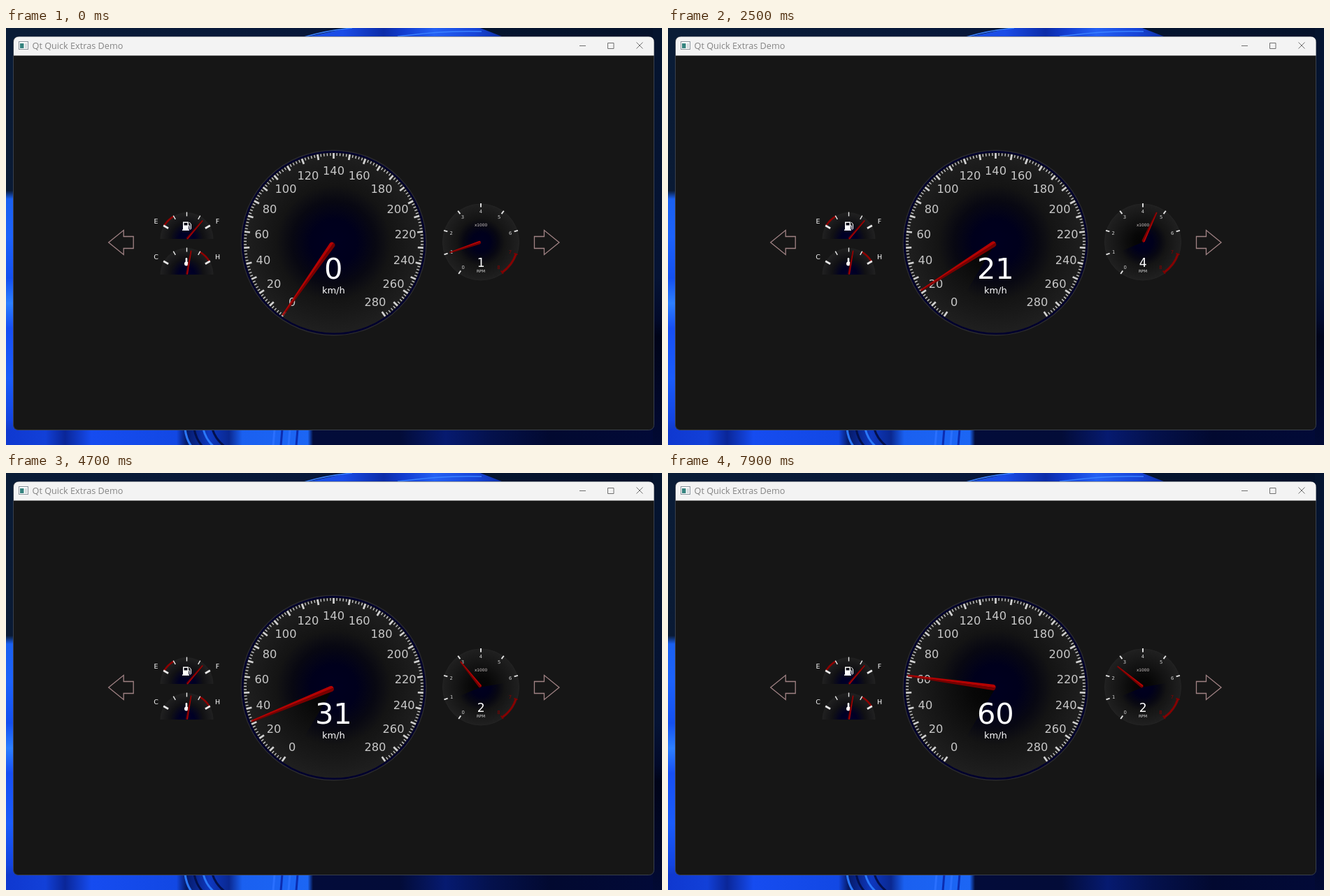
These frames come from a looping animation (938x597 px, 8 s). An HTML page:

```html
<!DOCTYPE html>
<html lang="en">
<head>
<meta charset="utf-8">
<title>Dashboard</title>
<style>
  html, body { margin: 0; width: 100%; height: 100%; overflow: hidden; background: #04102a; }
  svg { display: block; width: 938px; height: 597px; }
  text { font-family: "DejaVu Sans", sans-serif; text-anchor: middle; }
  .title { font-family: "Open Sans", sans-serif; text-anchor: start; }
</style>
</head>
<body>
<svg id="stage" viewBox="0 0 938 597"></svg>
<script>
const NS = "http://www.w3.org/2000/svg";
const stage = document.getElementById("stage");

function add(tag, attrs, parent = stage) {
  const el = document.createElementNS(NS, tag);
  for (const k in attrs) el.setAttribute(k, attrs[k]);
  parent.appendChild(el);
  return el;
}
const rect = (x, y, width, height, fill, more) => add("rect", { x, y, width, height, fill, ...more });
const circle = (cx, cy, r, fill, more) => add("circle", { cx, cy, r, fill, ...more });
const stroke = (d, color, width, more) =>
  add("path", { d, fill: "none", stroke: color, "stroke-width": width, ...more });

// Text centred vertically on its digits
function label(s, x, y, size, fill = "#fff", more) {
  const el = add("text", { x, y: y + size * 0.364, "font-size": size, fill, ...more });
  el.textContent = s;
  return el;
}

// stops: "offset color, offset color, ..."
function gradient(id, kind, attrs, stops) {
  const g = add(kind, { id, ...attrs });
  for (const s of stops.split(",")) {
    const [offset, color] = s.trim().split(" ");
    add("stop", { offset, "stop-color": color }, g);
  }
  return `url(#${id})`;
}
const across = (id, stops) => gradient(id, "linearGradient", {}, stops);
const down = (id, stops) => gradient(id, "linearGradient", { x2: 0, y2: 1 }, stops);
const radial = (id, cx, cy, r, stops) =>
  gradient(id, "radialGradient", { cx, cy, r, gradientUnits: "userSpaceOnUse" }, stops);

// Angle in degrees, clockwise from straight up
function polar(c, r, deg) {
  const a = deg * Math.PI / 180;
  return [c.x + r * Math.sin(a), c.y - r * Math.cos(a)];
}
const tick = (c, r1, r2, deg, color, width) =>
  stroke(`M${polar(c, r1, deg)}L${polar(c, r2, deg)}`, color, width);
const arc = (c, r, a, b, color, width) =>
  stroke(`M${polar(c, r, a)}A${r} ${r} 0 0 1 ${polar(c, r, b)}`, color, width);
const wedge = (c, r, a, b) =>
  `M${c.x} ${c.y}L${polar(c, r, a)}A${r} ${r} 0 ${b - a > 180 ? 1 : 0} 1 ${polar(c, r, b)}Z`;

function needle(c, len, base, tip) {
  const g = add("g", {});
  const half = (side, fill) => add("path", {
    d: `M0 0Q${side * base} 0 ${side * base} ${-base}L${side * tip} ${-len}H0Z`, fill
  }, g);
  half(-1, "#780000");
  half(1, "#b40202");
  return deg => g.setAttribute("transform", `translate(${c.x} ${c.y}) rotate(${deg})`);
}

function wallpaper() {
  rect(0, 0, 938, 597, "#04102a");
  rect(0, 0, 938, 14, across("top", "0 #0a1c36, .5 #07173a, .75 #05142e, 1 #04112a"));
  add("path", { d: "M424 14L490 0H678L714 14Z", fill: across("petal", "0 #1a50e0, .2 #1a4ce8, .4 #0c2ca8, .5 #123cd0, .65 #2460f4, .85 #1745d8, 1 #0c2ca0") });
  rect(0, 0, 12, 597, down("left", "0 #0a1c36, .39 #0a1a34, .41 #1a60f0, .5 #1c62fa, .6 #1450f0, .66 #2d80ff, .72 #174ff4, .84 #1a5cfa, .94 #1344e0, 1 #0c2ca8"));
  rect(0, 574, 938, 23, across("bottom", "0 #0f38d0, .06 #1240d8, .09 #0a2698, .13 #164cf0, .26 #1248e4, .275 #061a68, .31 #0e38c0, .34 #0a2890, .36 #1a60f0, .46 #1c66f4, .468 #030c3a, .6 #030c38, .67 #061a70, .74 #04114c, .83 #020930, 1 #020a38"));
  rect(925, 0, 13, 597, down("right", "0 #05142e, .6 #051334, .7 #020a2a, .74 #000418, 1 #020a34"));
  for (let i = 0; i < 4; i++) {
    stroke(`M${256 + i * 13} 574Q${258 + i * 14} 590 ${266 + i * 16} 600`, i % 2 ? "#03104c" : "#2a78fa", 3);
    stroke(`M${384 + i * 11} 574L${382 + i * 11} 598`, i % 2 ? "#0b2cb0" : "#2a70ff", 3);
  }
  stroke("M426 13Q460 3 495 0M560 12Q630 3 680 5", "#3a80ff", 1.5);
}

function appWindow() {
  rect(10.5, 12.5, 916, 563, "#161616", { rx: 7, stroke: "#39404c" });
  add("path", { d: "M11 39.500V20Q11 12.500 18.500 12.500H919Q926.500 12.500 926.500 20V39.500Z", fill: "#f3f3f3" });
  rect(18.5, 19.5, 13, 11, "#fff", { stroke: "#8a949c" });
  rect(20, 22, 5.5, 7, "#35837f");
  rect(27, 22, 3, 7, "#d4dadd");
  label("Qt Quick Extras Demo", 37.5, 25.6, 12.7, "#858585", { class: "title" });
  stroke("M820 25.500H829M860.500 21.500H869V29.500H860.500ZM901.500 20.500L910.500 29.500M910.500 20.500L901.500 29.500", "#707070", 1);
}

function turnArrow(x, dir) {
  const d = "M0 18L21.500 .6V9.500H35.500V26.500H21.500V35.400Z";
  const el = stroke(d, "#a08284", 1.3, { transform: `translate(${x} 289) scale(${dir} 1)` });
  return on => el.setAttribute("fill", on ? "#008000" : "none");
}

function halfGauge(id, y, redFrom, angle, low, high) {
  const c = { x: 258.5, y };
  const face = radial(id, c.x, c.y, 38, "0 #00002c, .3 #000024, .62 #111114, 1 #212121");
  add("path", { d: `M${c.x - 38} ${y}A38 38 0 0 1 ${c.x + 38} ${y}Z`, fill: face });
  arc(c, 37.5, redFrom, redFrom + 30, "#8c0000", 2.6);
  for (let a = -60; a <= 60; a += 30) {
    const end = Math.abs(a) === 60;
    tick(c, 38.5, end ? 30.5 : 32.5, a, "#e8e8e8", end ? 2.6 : 1.4);
  }
  label(low, 214.5, y - 25.5, 9.5);
  label(high, 302.5, y - 25.5, 9.5);
  const icon = add("g", { fill: "#fff" });
  needle(c, 35, 1.5, 0.9)(angle);
  return icon;
}

// A round dial whose swept part turns from blue to black
function dial(id, c, r, start, top, needleSize) {
  const face = radial(id, c.x, c.y, r, "0 #000020, .25 #00001c, .45 #080812, .62 #141414, 1 #202020");
  const dark = radial(id + "Dark", c.x, c.y, r, "0 #030303, .25 #070707, .45 #0e0e0e, .62 #141414, 1 #202020");
  circle(c.x, c.y, r, face);
  const swept = add("path", { fill: dark });
  const angle = v => -145 + v * 290 / top;
  let turn;
  return {
    angle,
    addNeedle() { turn = needle(c, ...needleSize); },
    set(v, max) {
      turn(angle(v));
      swept.setAttribute("d", max > start ? wedge(c, r * 0.62, angle(start) - 4, angle(max) + 4) : "");
    }
  };
}

wallpaper();
appWindow();
turnArrow(146.7, 1);
const rightArrow = turnArrow(791, -1);

const pump = halfGauge("fuel", 302, -60, 40.3, "E", "F");
add("path", { d: "M253 277.500H261V288.500H262V290H252V288.500H253ZM254.500 279V282.500H259.500V279Z", "fill-rule": "evenodd" }, pump);
add("path", { d: "M261 283H262.500V287.500Q263.500 289 264.500 287.500V281L262 278", fill: "none", stroke: "#fff" }, pump);
const thermo = halfGauge("temp", 353, 30, 10, "C", "H");
add("rect", { x: 256.7, y: 329, width: 2.6, height: 8, rx: 1.3 }, thermo);
add("circle", { cx: 258, cy: 337.6, r: 3 }, thermo);

// Speedometer
const sc = { x: 468.5, y: 307.5 };
const speed = dial("speed", sc, 132, 0, 280, [127, 4.2, 1.4]);
circle(sc.x, sc.y, 132.3, "none", { stroke: "#2a2a2e", "stroke-width": 1.4 });
circle(sc.x, sc.y, 130.3, "none", { stroke: "#00002e", "stroke-width": 2.6 });
for (let v = 0; v <= 280; v += 2) {
  const major = v % 10 === 0, a = speed.angle(v);
  tick(sc, 128.5, major ? 120.5 : 124.5, a, "#d2d2d2", major ? 2.7 : 1.3);
  if (v % 20 === 0) label(v, ...polar(sc, 103.5, a), 16.2, "#c8c8c8");
}
speed.addNeedle();
const speedText = label("0", 468.3, 344.3, 41.5);
label("km/h", 468.3, 375, 13);

// Rev counter
const rc = { x: 679, y: 306.5 };
const revs = dial("revs", rc, 54.5, 1, 8, [47, 2.3, 0.9]);
circle(rc.x, rc.y, 54.5, "none", { stroke: "#242424", "stroke-width": 1 });
arc(rc, 53, revs.angle(7), revs.angle(8), "#850000", 3);
for (let v = 0; v <= 8; v++) {
  const a = revs.angle(v), red = v > 6;
  tick(rc, 55.5, 50, a, red ? "#7c0000" : "#e4e4e4", 1.9);
  label(v, ...polar(rc, 44.3, a), 6.8, red ? "#8a0000" : "#d4d4d4");
}
label("x1000", 679, 281.5, 5.8, "#d8d0d0");
revs.addNeedle();
const revText = label("1", 679.2, 335.3, 17.2);
label("RPM", 679, 348.4, 5.6, "#ddd");

// Gear phases: begin, end, speed from/to, revs from/to
const phases = [
  [690, 3490, 0, 30, 1, 6.1],
  [3490, 3950, 30, 26, 6, 2.4],
  [3950, 6770, 26, 60, 2.4, 5.6],
  [6770, 7310, 60, 56, 5.6, 2.3],
  [7310, 10110, 56, 100, 2.3, 5.1]
];

function valuesAt(t) {
  const [begin, end, k0, k1, r0, r1] = phases.find(p => t < p[1]);
  const u = Math.max(0, (t - begin) / (end - begin));
  const e = (1 - Math.cos(Math.PI * u)) / 2;
  return [k0 + (k1 - k0) * e, r0 + (r1 - r0) * e];
}

function draw(t) {
  const [kph, rpm] = valuesAt(t);
  let maxKph = kph, maxRpm = rpm;
  for (const p of phases) {
    if (p[1] > t) break;
    maxKph = Math.max(maxKph, p[3]);
    maxRpm = Math.max(maxRpm, p[5]);
  }
  speed.set(kph, maxKph);
  revs.set(rpm, maxRpm);
  speedText.textContent = Math.floor(kph);
  revText.textContent = Math.floor(rpm);
  rightArrow(t >= 300 && t < 800);
}

let begun;
function tickFrame(now) {
  begun ??= now;
  draw(Math.floor((now - begun) % 8000 / 100) * 100);
  requestAnimationFrame(tickFrame);
}
draw(0);
requestAnimationFrame(tickFrame);
</script>
</body>
</html>
```
